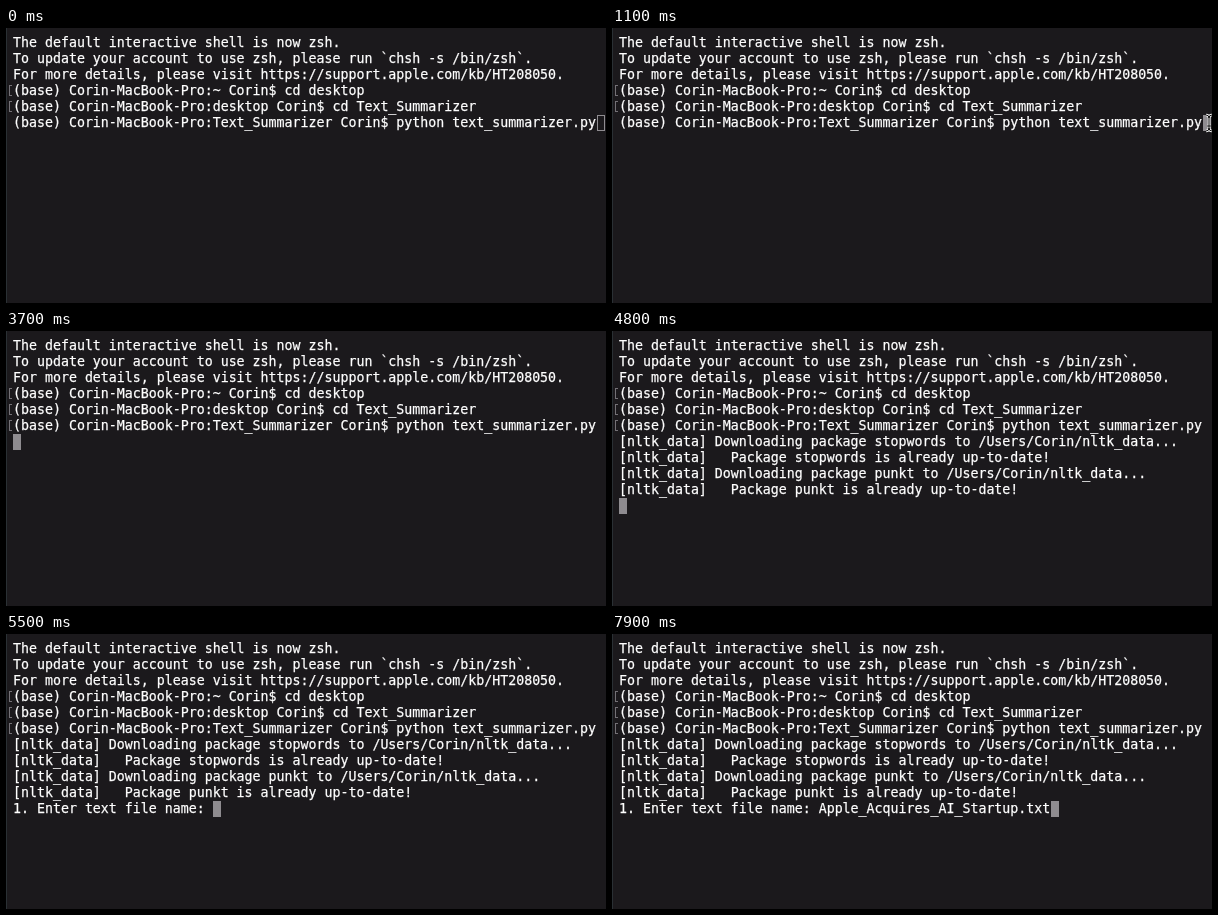
Write an HTML page with a canvas that moves like this. It is 600 by 275 pixels and loops after 8000 ms.

```html
<!DOCTYPE html>
<html lang="en">
<head>
<meta charset="utf-8">
<title>Terminal</title>
<style>
  html, body { margin: 0; width: 100%; height: 100%; overflow: hidden; background: #1b191c; }
  canvas, pre { position: absolute; left: 0; top: 0; }
  pre {
    left: 7px; top: 7px; margin: 0; color: #fff;
    font: 13.288px/16px "DejaVu Sans Mono", "Noto Sans Mono", monospace;
    font-variant-ligatures: none;
    -webkit-text-stroke: 0.25px #fff;
  }
</style>
</head>
<body>
<canvas id="stage" width="600" height="275"></canvas>
<pre id="text"></pre>
<script>
const LOOP = 8000, CELL = 8, ROW = 16, LEFT = 7, TOP = 7;
const ctx = document.getElementById('stage').getContext('2d');
const pre = document.getElementById('text');

const user = 'Corin';
const prompt = (dir, cmd) => `(base) ${user}-MacBook-Pro:${dir} ${user}$ ${cmd}`;
const fetching = name =>
  `[nltk_data] Downloading package ${name} to /Users/${user}/nltk_data...\n` +
  `[nltk_data]   Package ${name} is already up-to-date!\n`;

// Output in the order it is printed
const output = [
  [0, 'The default interactive shell is now zsh.\n' +
      'To update your account to use zsh, please run `chsh -s /bin/zsh`.\n' +
      'For more details, please visit https://support.apple.com/kb/HT208050.\n' +
      prompt('~', 'cd desktop') + '\n' +
      prompt('desktop', 'cd Text_Summarizer') + '\n' +
      prompt('Text_Summarizer', 'python text_summarizer.py')],
  [1700, '\n'],
  [4800, fetching('stopwords') + fetching('punkt')],
  [5300, '1. Enter text file name: '],
  [7700, 'Apple_Acquires_AI_Startup.txt']
];

// Mouse pointer: start time, centre x, centre y
const pointer = [[600, 601, 104], [700, 600, 103], [800, 599, 102], [1100, 597, 95]];
const FOCUS = 1100, ENTER = 1700;

function drawMark(row) {
  const y = TOP + row * ROW + 2;
  ctx.fillStyle = '#747176';
  ctx.fillRect(3, y, 1, 11);
  ctx.fillRect(3, y, 3, 1);
  ctx.fillRect(3, y + 10, 3, 1);
}

function drawCursor(col, row, focused) {
  const x = LEFT + col * CELL, y = TOP + row * ROW;
  if (focused) {
    ctx.fillStyle = '#8f8c90';
    ctx.fillRect(x, y, CELL, ROW);
  } else {
    ctx.strokeStyle = '#8f8c90';
    ctx.lineWidth = 1;
    ctx.strokeRect(x + 0.5, y + 0.5, CELL - 1, ROW - 1);
  }
}

function drawPointer(x, y) {
  ctx.beginPath();
  for (const s of [-1, 1]) {
    ctx.moveTo(x - 3, y + 8 * s);
    ctx.quadraticCurveTo(x, y + 8 * s, x, y + 5 * s);
    ctx.quadraticCurveTo(x, y + 8 * s, x + 3, y + 8 * s);
  }
  ctx.moveTo(x, y - 6);
  ctx.lineTo(x, y + 6);
  ctx.moveTo(x - 2, y + 3);
  ctx.lineTo(x + 2, y + 3);
  for (const [color, width] of [['#f2f2f2', 2.6], ['#111', 1]]) {
    ctx.strokeStyle = color;
    ctx.lineWidth = width;
    ctx.stroke();
  }
}

function draw(t) {
  const text = output.filter(([at]) => t >= at).map(([, part]) => part).join('');
  if (pre.textContent !== text) pre.textContent = text;

  ctx.fillStyle = '#1b191c';
  ctx.fillRect(0, 0, 600, 275);
  ctx.fillStyle = '#2a3034';
  ctx.fillRect(0, 0, 1, 275);

  [3, 4].forEach(drawMark);
  if (t >= ENTER) drawMark(5);

  const lines = text.split('\n');
  drawCursor(lines[lines.length - 1].length, lines.length - 1, t >= FOCUS);

  const spot = pointer.filter(([at]) => t >= at).pop();
  if (spot && t < ENTER) drawPointer(spot[1], spot[2]);
}

const start = performance.now();
function tick(now) {
  draw(Math.max(0, now - start) % LOOP);
  requestAnimationFrame(tick);
}
draw(0);
requestAnimationFrame(tick);
</script>
</body>
</html>
```
